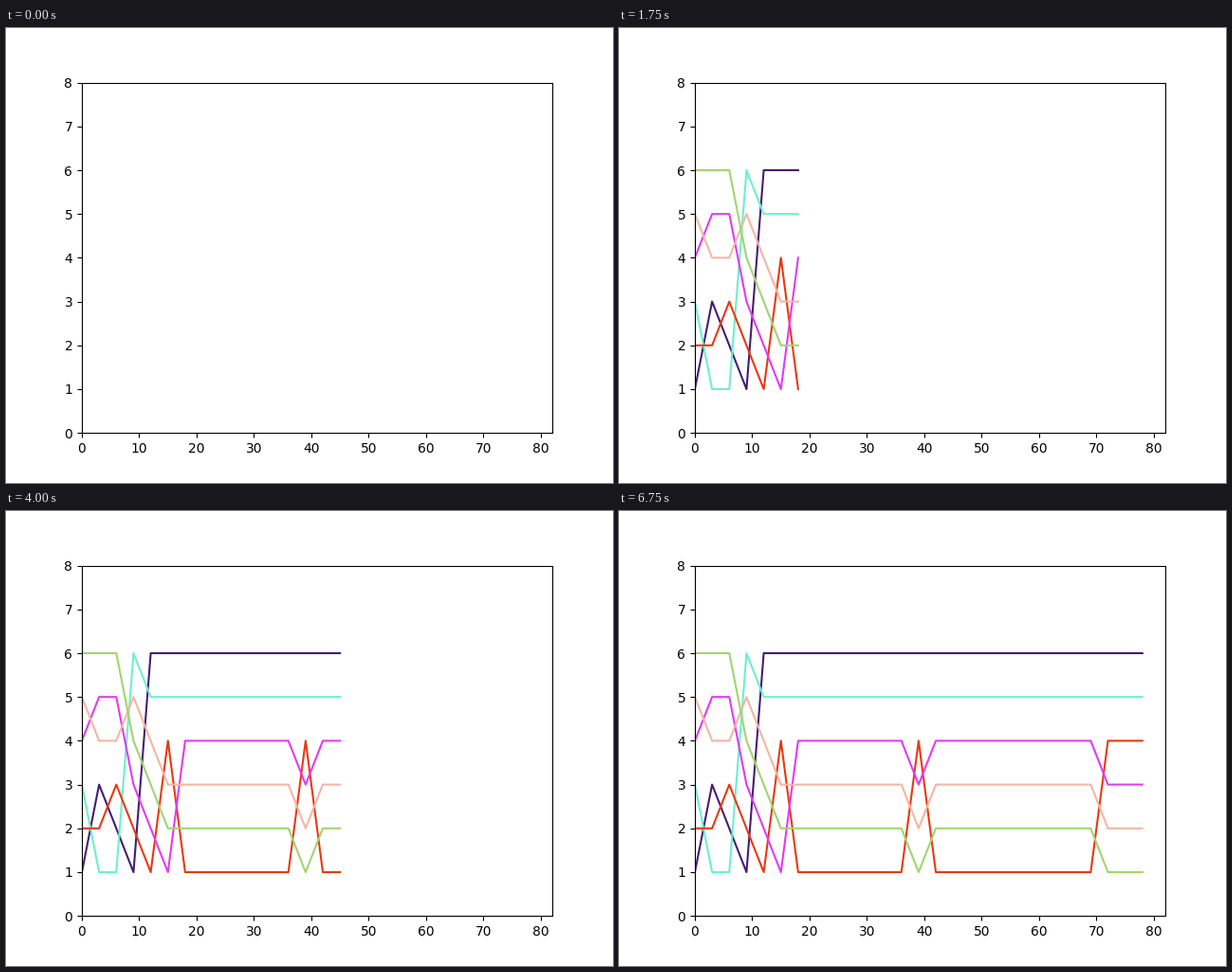
Recreate the animation shown at these times as a matplotlib script. Size 640 by 480 pixels, loop 7 s.

```python
import matplotlib.pyplot as plt
from matplotlib.animation import FuncAnimation

# Listed in drawing order
COLORS = {
    "purple": "#461c71",
    "cyan": "#6cf1cb",
    "red": "#e93810",
    "magenta": "#e23af3",
    "peach": "#f6b5a3",
    "green": "#a1d56f",
}
START = ["purple", "red", "cyan", "magenta", "peach", "green"]

# Step -> lines that move to a new rank while the others close up
MOVES = {
    1: [("cyan", 1), ("purple", 3), ("magenta", 5)],
    2: [("purple", 2)],
    3: [("cyan", 6), ("peach", 5)],
    4: [("purple", 6)],
    5: [("red", 4)],
    6: [("magenta", 4), ("red", 1)],
    13: [("red", 4)],
    14: [("red", 1)],
    24: [("red", 4)],
}
STEP = 3
FRAMES = 28


def rank_histories():
    order = list(START)
    histories = {name: [] for name in COLORS}
    for step in range(FRAMES - 1):
        for name, rank in MOVES.get(step, []):
            order.remove(name)
            order.insert(rank - 1, name)
        for rank, name in enumerate(order, start=1):
            histories[name].append(rank)
    return histories


plt.rcParams["font.family"] = "DejaVu Sans"
fig, ax = plt.subplots(figsize=(6.4, 4.8), dpi=100)
ax.set_xlim(0, 82)
ax.set_ylim(0, 8)

ranks = rank_histories()
xs = [STEP * step for step in range(FRAMES - 1)]
lines = {name: ax.plot([], [], color=color, lw=1.5)[0]
         for name, color in COLORS.items()}


def update(frame):
    for name, line in lines.items():
        line.set_data(xs[:frame], ranks[name][:frame])
    return list(lines.values())


anim = FuncAnimation(fig, update, frames=FRAMES, interval=250, repeat=True,
                     repeat_delay=0)
plt.show()
```
